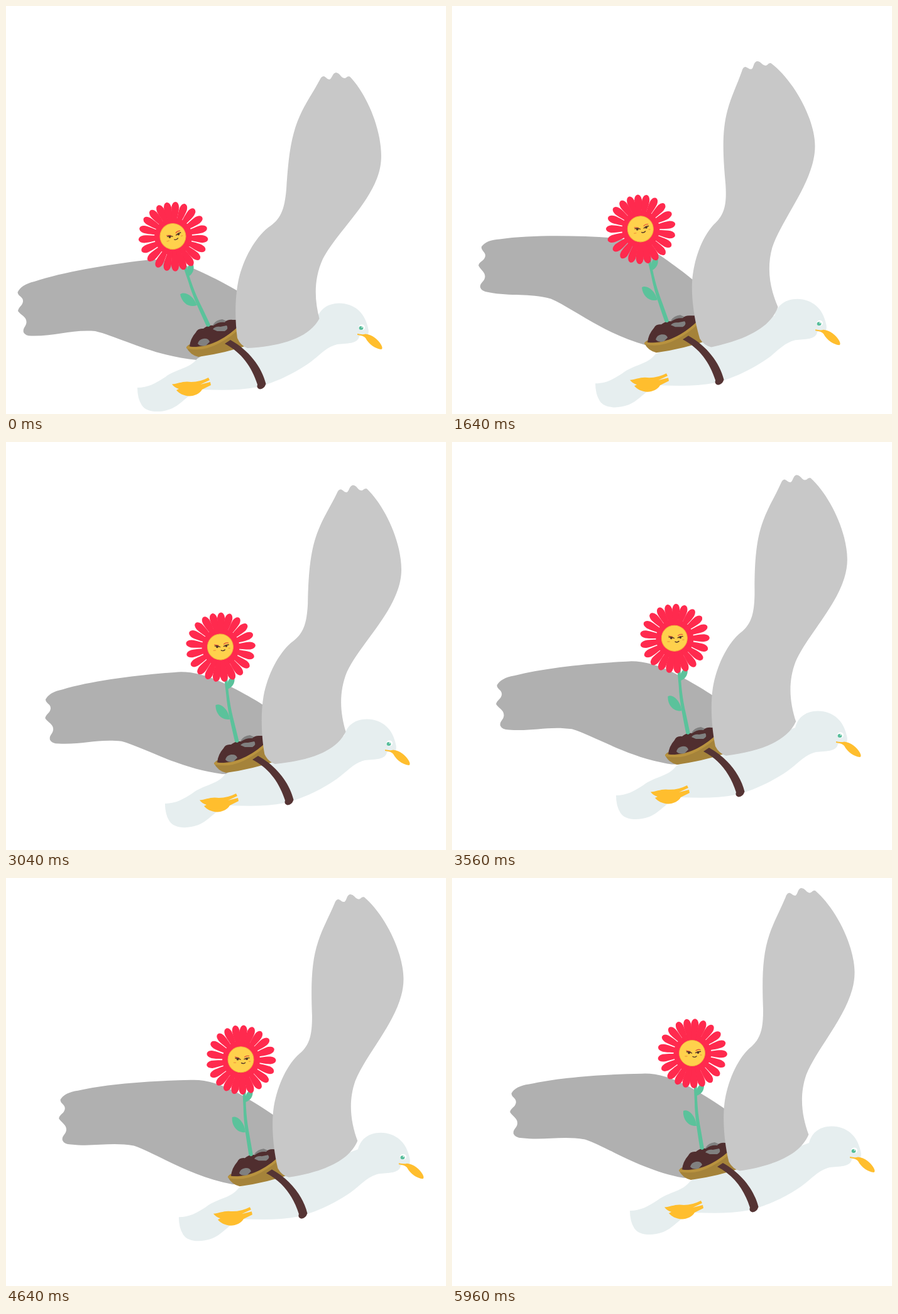
Animation of 700x650 px, one loop 6 s. Source, as an HTML page:

```html
<!DOCTYPE html>
<html lang="en">
<head>
<meta charset="utf-8">
<title>Gull carrying a flower</title>
<style>
  html, body { margin: 0; width: 100%; height: 100%; overflow: hidden; background: #fff; }
  svg { display: block; width: 700px; height: 650px; }
</style>
</head>
<body>
<svg viewBox="0 0 700 650">
  <g id="bird">
    <path id="farWing" fill="#b0b0b0" d="M400 474C366 451 340 437 300 419Q255 400 222 405C160 412 90 424 45 439Q24 444 18.500 456C19 463 28 463 27 471C26 478 20 479 19 486C24 493 33 495 32.500 504C32 511 26 513 28 520Q31 526 42 525.500C80 526 105 515 142 518C180 527 235 558 304 564L380 560Z"/>

    <path fill="#e6eeef" d="M209 608C226 608 238 601 252 592C270 578 292 578 304 562C318 552 340 545 372 538L440 520L494 500C499 482 512 474 530 473.500C555 474 571 489 576 513Q578 520 575 526Q566 523 562 526C560 539 542 537 527 539C508 544 500 556 482 569C450 591 420 602 400 607C370 613 340 612 310 611C292 615 280 635 262 642C243 649 223 647 216 636Q209 625 209 608Z"/>
    <path fill="#ffbe2e" d="M559 522Q567 524 572 522.500C583 524 592 531 597 540Q600 546 597 547C588 546 578 540 572 529Q569 525 559 524Z"/>
    <ellipse cx="566" cy="512" rx="5" ry="4.500" fill="#fff"/>
    <ellipse cx="565" cy="513" rx="3.400" ry="3" fill="#56bd9a"/>
    <circle cx="566.500" cy="511.500" r="1" fill="#fff"/>
    <path fill="#ffbe2e" d="M264 602.500C272 602 279 598.500 288 598.500Q306 600.500 322 592L324 596L309 603L325 599L326 604L312 611C308 618 300 621 292 621.500C282 621 275 617 271 612L275 610Q268 608 264 602.500Z"/>

    <path fill="#a5833a" d="M287 544Q291 537 300 539L375 500L392 538Q350 553 306 559Q293 556 287 544Z"/>
    <path fill="#808080" d="M329 508Q334 500 344 499L351 502L351 508L335 512Z"/>
    <path fill="#502e2f" d="M292 543Q293 530 302 520Q305 513 314 514Q321 508 330 509Q338 503 348 504Q352 499 361 500L378 500L372 508C356 526 325 545 292 543Z"/>
    <g fill="#808080">
      <path d="M305 538Q307 531 314 530Q322 529 324 535L318 541Q309 543 305 538Z"/>
      <path d="M329 515Q333 510 341 511L351 509Q355 514 348 518L336 518Z"/>
    </g>
    <path fill="none" stroke="#b9933f" stroke-width="4" stroke-linecap="round" d="M289 544Q314 549 339 535Q358 525 374 509"/>
    <path fill="#553434" d="M348 538L357 532C386 548 407 575 413.500 602Q411 610 404 610.500Q398 609 400 603C391 575 375 552 348 538Z"/>

    <g id="flower">
      <path fill="#5bc29b" d="M384.500 326L390 326C389 352 391 376 396 402L401 431Q398 435 394.500 431C391 407 386 380 386 356Z"/>
      <path fill="#5bc29b" d="M389 395C376 396 367 385 368 371C375 367 388 378 389 395Z"/>
      <path fill="#5bc29b" d="M389 347C387 335 393 329 400 326C403 334 399 344 389 347Z"/>
      <g id="petals" fill="#ff2a4e"><circle cx="382.500" cy="279.500" r="30"/></g>
      <circle cx="382" cy="279" r="20.500" fill="#ffd14c" stroke="#f2ad3b" stroke-width="1"/>
      <g fill="none" stroke-linecap="round">
        <path stroke="#f2a13f" stroke-width="1.500" d="M371 284h3M395 282h2"/>
        <path stroke="#e2533c" stroke-width="1.300" d="M373 275l6 1.500M388 275q3-2.500 7-1.500"/>
        <path stroke="#533529" stroke-width="1.400" d="M373.500 277q4-1 8 2M387.500 278.500q4-2.500 8-2M383 284.500q3 2 6-.5"/>
      </g>
      <g fill="#533529"><circle cx="377" cy="278.500" r="1.900"/><circle cx="391.500" cy="278" r="1.900"/></g>
    </g>

    <path id="nearWing" fill="#c8c8c8" d="M384 545Q373 541 368 529C364 500 364 464 370 436C378 402 396 370 417 353C437 340 443 325 446 292C449 240 454 205 467 176C476 155 489 137 499 118Q502 111 506 112C511 115 511 117 515 117C519 115 519 107 525 106C532 107 532 114 538 115C542 115 542 111 547 112.500C567 133 587 172 594 210C598 233 599 252 590 275C572 322 525 363 504 403C489 436 491 469 498.500 498C482 529 438 542 384 545Z"/>
  </g>
</svg>
<script>
const $ = id => document.getElementById(id);
const { PI, sin, cos, min, max } = Math;
const LOOP = 6000, STEP = 40, PETALS = 21;

// Petals crowd together a little on two opposite diagonals
for (let i = 0; i < PETALS; i++) {
  const a = 2 * PI * i / PETALS, turn = a * 180 / PI + 1 + 4 * sin(2 * a);
  const petal = document.createElementNS($('bird').namespaceURI, 'path');
  petal.setAttribute('d', 'M15-2C28-3.500 37-6 47-6Q55-5 55.500 0Q55 5 47 6C37 6 28 3.500 15 2Z');
  petal.setAttribute('transform', `translate(382.5 279.500) rotate(${turn})`);
  $('petals').append(petal);
}

// Cosine ease whose clock is bent by two sine terms
function glide(p, bend, skew) {
  return (1 - cos(PI * (p + bend * sin(PI * p) + skew * sin(2 * PI * p)))) / 2;
}

function smooth(from, to, p) {
  const u = max(0, min(1, (p - from) / (to - from)));
  return u * u * (3 - 2 * u);
}

const move = (id, value) => $(id).setAttribute('transform', value);

function draw(now) {
  const p = Math.floor(now % LOOP / STEP) * STEP / LOOP;

  // One wing beat, then a slow lift that is held
  const beat = sin(PI * min(1, p / .48)) ** 2;
  const lift = smooth(.3, .78, p);
  const tilt = -8.5 * (1 + cos(PI * min(1, p + .17)));

  move('bird', `translate(${74 * glide(p, .055, .024)} ${-78 * glide(p, -.066, -.035)})`);
  move('farWing', `translate(${3 * beat} ${-beat}) rotate(${10.7 * beat + 5.5 * lift} 385 460)`);
  move('nearWing', `translate(${10 * beat} ${6 * beat}) rotate(${-9.2 * beat - 5.6 * lift} 380 545)`);
  move('flower', `translate(-74 78) rotate(${tilt} 397 437)`);
}

const start = performance.now();
function tick() {
  draw(performance.now() - start);
  requestAnimationFrame(tick);
}
tick();
</script>
</body>
</html>
```
